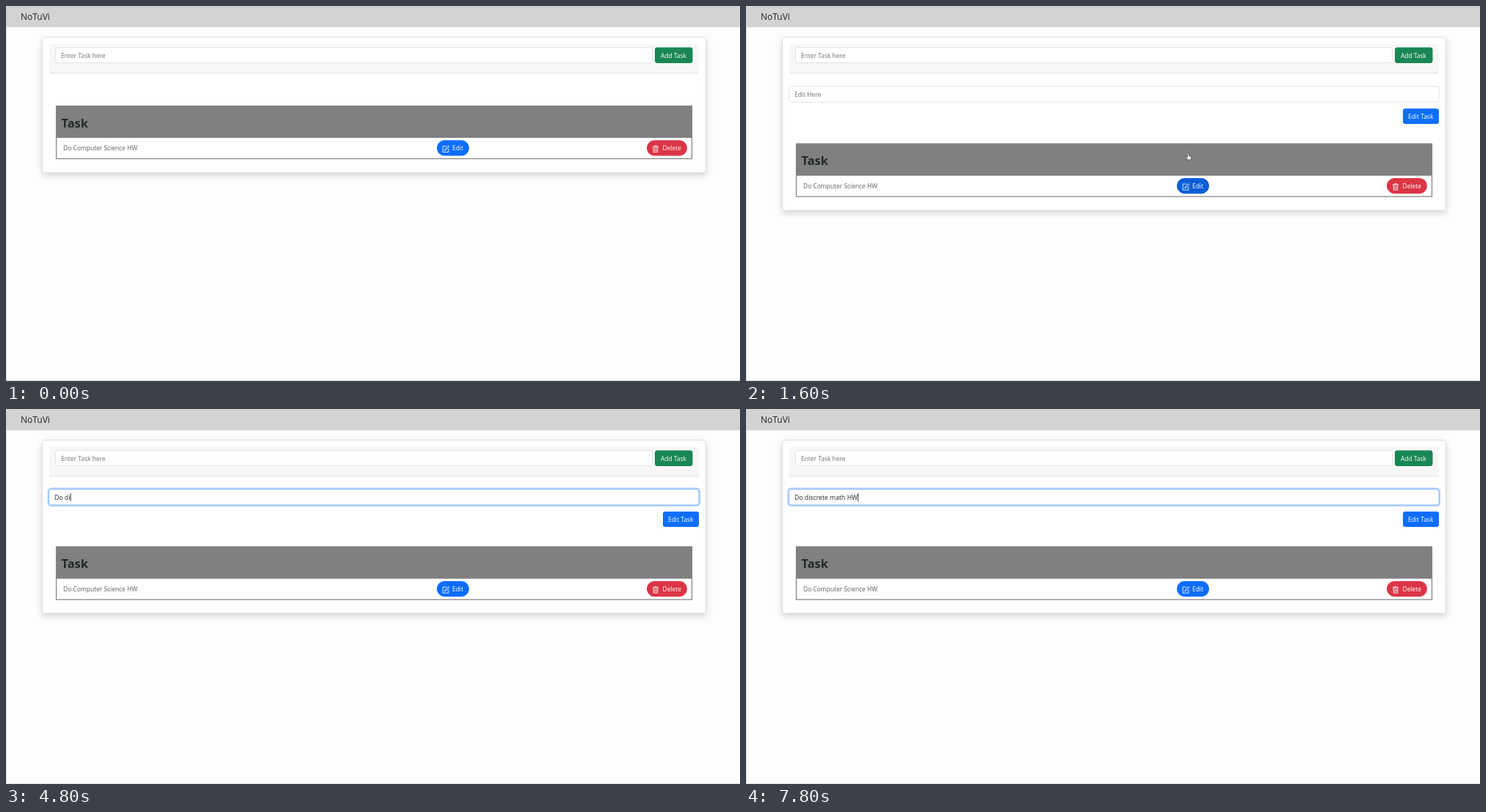
Recreate the animation shown at these times as an HTML page. Size 1000 by 512 pixels, loop 8000 ms.

```html
<!DOCTYPE html>
<html lang="en">
<head>
<meta charset="utf-8">
<title>Task list</title>
<style>
  html, body { margin: 0; width: 100%; height: 100%; overflow: hidden; background: #fdfdfd; }
  svg { display: block; width: 100%; height: 100%; }
  text { font: 8.45px "Open Sans", "Noto Sans", sans-serif; fill: #fff; }
  .brand { font-size: 12px; fill: #212529; }
  .heading { font-size: 16.4px; font-weight: 700; fill: #212929; }
  .hint { fill: #6c757d; }
  .row { fill: #596066; }
  .typed { font-size: 8.7px; fill: #212529; }
  .field { fill: #fff; stroke: #dfe3e7; }
  .icon { fill: none; stroke: #fff; stroke-width: .85; stroke-linecap: round; stroke-linejoin: round; }
  #card { fill: #fff; stroke: #dcdee0; filter: drop-shadow(0 4.5px 4.5px rgba(0, 0, 0, .15)); }
</style>
</head>
<body>
<svg viewBox="0 0 1000 512">
  <rect width="1000" height="512" fill="#fdfdfd"/>
  <path d="M.5 29V511.5H1000" fill="none" stroke="#dedede"/>
  <rect width="1000" height="29" fill="#d3d3d3"/>
  <text class="brand" x="20" y="19">NoTuVi</text>

  <rect id="card" x="49.5" y="42.5" width="904" height="185" rx="3"/>
  <rect x="59" y="52" width="885" height="40" fill="#f7f7f7"/>
  <path d="M59 91.5H944" stroke="#e2e2e2"/>
  <rect class="field" x="67.5" y="56.5" width="813" height="21" rx="3"/>
  <text class="hint" x="75" y="70.7">Enter Task here</text>
  <rect x="884" y="56.5" width="51.5" height="21.5" rx="3.4" fill="#198754"/>
  <text x="892" y="70.7">Add Task</text>

  <g id="editor">
    <rect id="ring" x="57.5" y="108.5" width="887.5" height="23.5" rx="4" fill="none" stroke="#0d6efd" stroke-width="2.3"/>
    <rect id="input" class="field" x="58.5" y="109.5" width="885.5" height="21.5" rx="3"/>
    <text id="entry" x="66" y="123.7"></text>
    <rect id="caret" y="115" width=".9" height="11" fill="#212529"/>
    <rect x="895" y="140" width="49" height="21" rx="3.2" fill="#0d6efd"/>
    <text x="902" y="153.8">Edit Task</text>
  </g>

  <g id="table">
    <rect x="68.5" y="136.5" width="866" height="72" fill="#fff" stroke="#808080" stroke-width="1.2"/>
    <rect x="68" y="136" width="867" height="44" fill="#808080"/>
    <text class="heading" x="75.5" y="165.6">Task</text>
    <text class="row" x="78" y="197.2">Do Computer Science HW</text>
    <rect id="edit" x="587" y="183.3" width="44" height="21.2" rx="10.6"/>
    <path class="icon" d="M599.5 191.3H595.2V199.5H602.8V195.5M598 197l.5-2 4-4.3 1.3 1.2-4 4.3z"/>
    <text x="608" y="197.2">Edit</text>
    <rect x="873" y="183.3" width="55" height="21.2" rx="10.6" fill="#dc3545"/>
    <path class="icon" d="M881.3 192.1h7.4M883.8 192v-1.2h2.4v1.2M882 192.3l.4 7.2h5.2l.4-7.2M884 194v3.8M886 194v3.8"/>
    <text x="894.5" y="197.2">Delete</text>
  </g>

  <g id="pointer" fill="#fff" stroke="#333" stroke-width=".7" stroke-linejoin="round">
    <path id="arrow" d="M0 0V9.5L2.2 7.5 3.7 10.8 5.1 10.2 3.7 7.1H6.7Z"/>
    <path id="hand" d="M-1-3.8Q0-5.2 1-3.8V-1L4-.2Q4.8 1.8 3.2 4.5H-.8L-3.2 1.2Q-3-.2-1 .8Z"/>
  </g>
</svg>
<script>
const LOOP = 8000, STEP = 100;
const PHRASE = "Do discrete math HW";
// Each pair: time in ms, characters typed so far.
const KEYS = [[4200, 1], [4400, 2], [4600, 4], [4800, 5], [5000, 6], [5200, 7], [5400, 8], [5500, 9],
  [5700, 10], [5900, 11], [6100, 13], [6300, 14], [6500, 15], [6600, 16], [6900, 18], [7000, 19]];
const CARET_TOGGLES = [2700, 3200, 3500, 3800, 4200, 7500, 7800];

const $ = id => document.getElementById(id);
const set = (id, attrs) => { for (const k in attrs) $(id).setAttribute(k, attrs[k]); };
const show = (id, on) => set(id, { visibility: on ? "inherit" : "hidden" });
const clamp = v => Math.max(0, Math.min(1, v));
const mix = (a, b, p) => a + (b - a) * p;

function drawPointer(t) {
  const reach = 1 - (1 - clamp((t - 300) / 500)) ** 2;
  const settle = clamp((t - 800) / 300);
  const leave = clamp((t - 1600) / 400);
  const x = mix(mix(650, 603.5, reach), mix(602.5, 470, leave) , settle);
  const y = mix(mix(465, 209.5, reach), mix(205.5, 121, leave), settle);
  set("pointer", { transform: `translate(${x} ${y})` });
  show("pointer", t >= 300 && t < 2000);
  const hand = t >= 800 && t <= 1600;
  show("hand", hand);
  show("arrow", !hand);
}

function drawEditor(t) {
  const focused = t >= 2700;
  const count = KEYS.reduce((n, [at, c]) => t >= at ? c : n, 0);
  const entry = $("entry");
  entry.textContent = count ? PHRASE.slice(0, count) : "Edit Here";
  entry.setAttribute("class", count ? "typed" : "hint");
  set("caret", { x: 66 + (count ? entry.getComputedTextLength() + .2 : 0) });
  show("caret", CARET_TOGGLES.filter(at => t >= at).length % 2);
  set("ring", { opacity: !focused ? 0 : t < 2800 ? .15 : .27 });
  $("input").style.stroke = focused ? "#86b7fe" : "";
}

function draw(now) {
  const t = Math.floor(now % LOOP / STEP) * STEP;
  const open = t >= 1600;
  show("editor", open);
  set("card", { height: open ? 236.5 : 185 });
  set("table", { transform: `translate(0 ${open ? 51.7 : 0})` });
  set("edit", { fill: t >= 900 && t < 1700 ? "#0b5ed7" : "#0d6efd" });
  if (open) drawEditor(t);
  else show("caret", false);
  drawPointer(t);
}

const start = performance.now();
function frame() {
  draw(performance.now() - start);
  requestAnimationFrame(frame);
}
frame();
</script>
</body>
</html>
```
